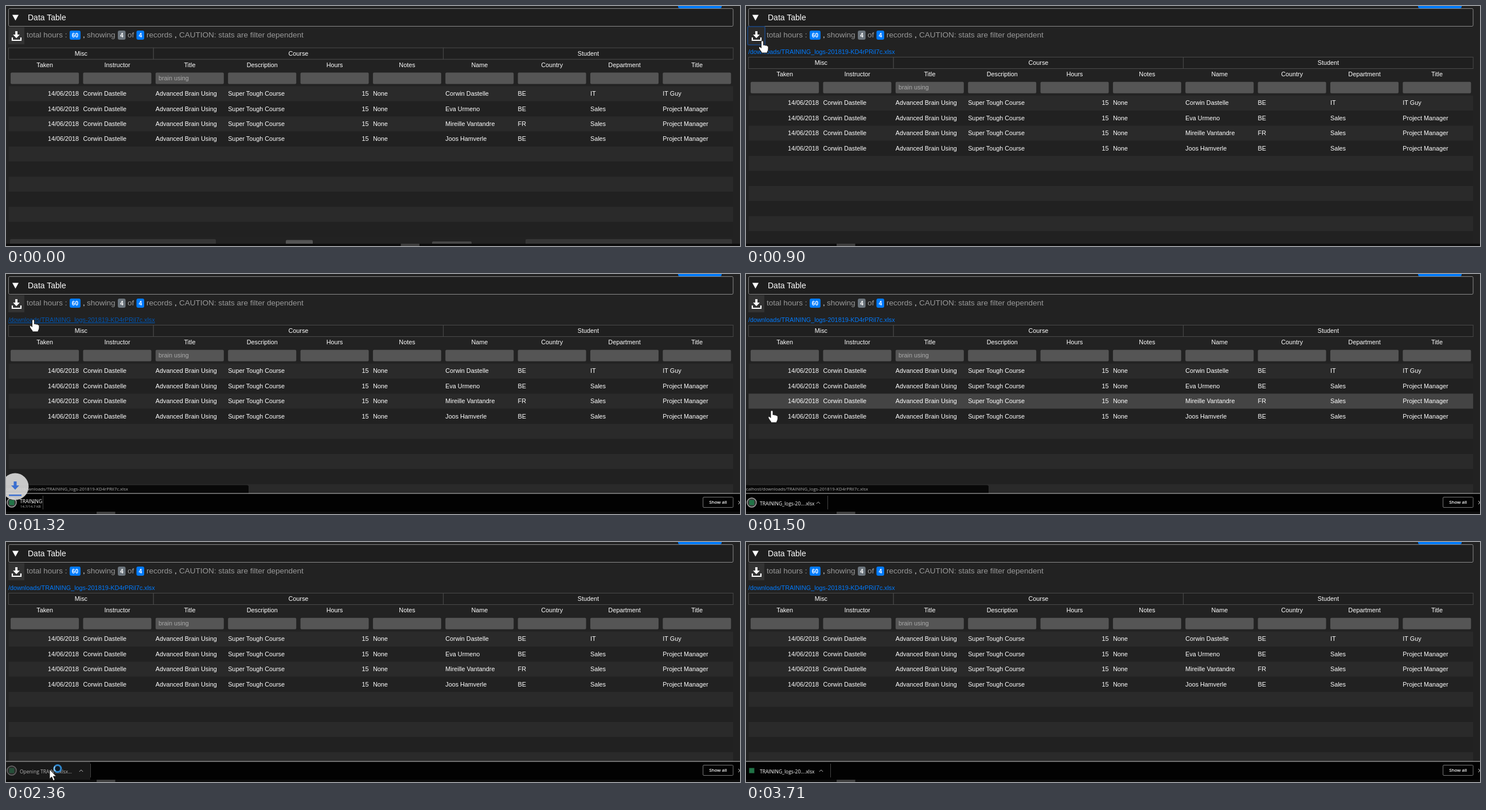
An HTML page for the animation above (3800 ms loop, 1280 by 420 pixels).

```html
<!DOCTYPE html>
<html lang="en">
<head>
<meta charset="utf-8">
<title>Data table export</title>
<style>
html, body { margin: 0; width: 100%; height: 100%; overflow: hidden; background: #222; }
svg { display: block; font-family: "Liberation Sans", Arial, sans-serif; font-size: 10.8px; }
.ui { font-family: "Open Sans", "Noto Sans", sans-serif; }
</style>
</head>
<body>
<svg id="stage" width="1280" height="420" viewBox="0 0 1280 420"></svg>
<script>
const LOOP = 3800;
const stage = document.getElementById('stage');

function el(tag, attrs, parent = stage) {
  const node = document.createElementNS('http://www.w3.org/2000/svg', tag);
  for (const key in attrs) node.setAttribute(key, attrs[key]);
  parent.appendChild(node);
  return node;
}
const group = (parent, attrs = {}) => el('g', attrs, parent);
const rect = (x, y, width, height, fill, parent, more) =>
  el('rect', { x, y, width, height, fill, ...more }, parent);
const path = (d, attrs, parent) => el('path', { d, ...attrs }, parent);
function text(str, x, y, fill, parent, more) {
  const node = el('text', { x, y, fill, ...more }, parent);
  node.textContent = str;
  return node;
}
const set = (node, key, value) => node.setAttribute(key, value);
const show = (node, on) => set(node, 'visibility', on ? 'visible' : 'hidden');
const move = (node, x, y) => set(node, 'transform', `translate(${x} ${y})`);
const mid = { 'text-anchor': 'middle' };

// Linear interpolation through rows of [time, value, value...]
function at(keys, t) {
  let i = 0;
  while (i < keys.length - 2 && t >= keys[i + 1][0]) i++;
  const [a, b] = [keys[i], keys[i + 1]];
  const k = Math.min(1, Math.max(0, (t - a[0]) / (b[0] - a[0])));
  return a.slice(1).map((v, n) => v + (b[n + 1] - v) * k);
}

// Page header
rect(0, 0, 1280, 420, '#222');
rect(1172, -6, 76, 10, '#007bff', stage, { rx: 3 });
rect(4.5, 4.5, 1263.5, 31, '#1e1e1e', stage, { rx: 2, stroke: '#8a8a8a' });
path('M11 15.5H22L16.5 25.5Z', { fill: '#fff' });
text('Data Table', 38, 25, '#fff', stage, { 'font-size': 14 });

const button = rect(4, 37, 28, 30, '#333');
const focusRing = rect(3, 36, 30, 32, 'none', stage, { rx: 2, stroke: '#1d3f6e', 'stroke-width': 2 });
path('M16.2 44h3.8v6h4l-5.9 6.3l-5.9-6.3h4z', { fill: '#fff' });
path('M11 55V60H26V55', { fill: 'none', stroke: '#fff', 'stroke-width': 2.2 });

const big = { 'font-size': 13.5 };
[['total hours :', 36], ['showing', 141], ['of', 212], ['records', 245],
 ['CAUTION: stats are filter dependent', 302]].forEach(([s, x]) => text(s, x, 55, '#999', stage, big));
[134, 294].forEach(x => text(',', x, 55, '#fff', stage, big));
[['60', 111, 19, '#007bff'], ['4', 195, 13.5, '#6c757d'], ['4', 227.5, 13.5, '#007bff']].forEach(([s, x, w, fill]) => {
  rect(x, 43, w, 16, fill, stage, { rx: 3 });
  text(s, x + w / 2, 54.7, '#fff', stage, { ...mid, 'font-size': 10.2, 'font-weight': 700 });
});

const FILE = 'TRAINING_logs-201819-KD4rPRil7c.xlsx';
const link = text('/downloads/' + FILE, 4, 84, '#007bff');

// Table
const table = group(stage);
const LEFT = 4.5, COL = 126.36, TOP = 140.3, ROW = 26.4;
const colX = i => LEFT + COL * i;

[['Misc', 0, 2], ['Course', 2, 6], ['Student', 6, 10]].forEach(([s, a, b]) => {
  rect(colX(a), 73.2, COL * (b - a), 20, '#1f1f1f', table, { stroke: '#4a4a4a' });
  text(s, (colX(a) + colX(b)) / 2, 87, '#fff', table, mid);
});
['Taken', 'Instructor', 'Title', 'Description', 'Hours', 'Notes', 'Name', 'Country', 'Department', 'Title'].forEach((s, i) => {
  text(s, colX(i) + COL / 2, 107, '#fff', table, mid);
  rect(colX(i) + 3.6, 116.5, 119, 20, '#555', table, { rx: 2 });
});
text('brain using', 266, 130, '#aaa', table);

const stripe = i => i % 2 ? '#212121' : '#2a2a2a';
const rows = Array.from({ length: 10 }, (_, i) =>
  rect(LEFT, TOP + ROW * i, 1263.5, ROW, stripe(i), table));
const TUTOR = 'Corwin Dastelle';
[[TUTOR, 'BE', 'IT', 'IT Guy'],
 ['Eva Urmeno', 'BE', 'Sales', 'Project Manager'],
 ['Mireille Vantandre', 'FR', 'Sales', 'Project Manager'],
 ['Joos Hamverle', 'BE', 'Sales', 'Project Manager']].forEach((person, r) => {
  ['14/06/2018', TUTOR, 'Advanced Brain Using', 'Super Tough Course', '15', 'None', ...person].forEach((s, i) => {
    const right = i === 0 || i === 4;
    text(s, colX(i) + (right ? 122.6 : 3.6), TOP + ROW * r + 16.9, '#fff', table,
      { 'text-anchor': right ? 'end' : 'start' });
  });
});
rect(LEFT, 404.4, 1263.5, 40, '#222', table);
[[7, 408, 359, '#363636'], [488, 409.5, 47, '#555'], [743, 412, 69, '#484848'], [906, 408, 360, '#363636']]
  .forEach(([x, y, w, fill]) => rect(x, y, w, 24, fill, table, { rx: 2 }));

// Link address shown at the window's lower left
const status = group(stage, { class: 'ui' });
rect(-5, 0, 428, 20, '#080808', status, { rx: 3 });
text('calhost/downloads/' + FILE, 0, 9.8, '#aaa', status, { 'font-size': 7.8 });

// Download shelf, drawn at its open place
const shelf = group(stage, { class: 'ui' });
rect(0, 384, 1280, 36, '#020202', shelf);
const itemBack = rect(0, 385, 147, 31, '#191919', shelf);
rect(0, 383.5, 1280, 1, '#c4c4c4', shelf);
const clip = el('clipPath', { id: 'item' }, shelf);
const clipBox = rect(0, 384, 147, 36, '#000', clip);
const item = group(shelf, { 'clip-path': 'url(#item)' });
const badge = el('circle', { cx: 10, cy: 400, r: 8, fill: '#383838', stroke: '#aaa', 'stroke-width': 1.4 }, item);
const fileIcon = rect(5.5, 395.5, 9, 9, '#217346', item);
const label = text('', 24, 405, '#fff', item, { 'font-size': 8.5 });
const size = text('14.7/14.7 KB', 25, 408.8, '#bbb', item, { 'font-size': 6.1 });
const chevron = path('M-3.2 402L0 398.8L3.2 402', { fill: 'none', stroke: '#bbb' }, shelf);
const divider = rect(0, 388, 1, 24, '#444', shelf);
rect(1215.5, 390.5, 52.5, 18, 'none', shelf, { rx: 1.5, stroke: '#777' });
text('Show all', 1241.7, 402.4, '#fff', shelf, { ...mid, 'font-size': 7.8, 'font-weight': 600 });
path('M1277 397l6 6M1277 403l6-6', { stroke: '#ccc' }, shelf);

// Falling download bubble
const bubble = group(stage);
el('circle', { r: 23.5, fill: '#dcdcdc', opacity: .9 }, bubble);
path('M-2.5-9h5v7h4.5l-7 7.5l-7-7.5h4.5zM-11 14h22v2.4h-22z', { fill: '#3b6fd0' }, bubble);

// Taskbar edge
rect(0, 416, 1280, 4, '#0c0c0c');
const task = rect(0, 416, 32.5, 4, '#404040');

// Pointers
const pointer = group(stage);
const outline = { fill: '#fff', stroke: '#111', 'stroke-width': .9, 'stroke-linejoin': 'round' };
const hand = path('M-2 1.5Q0-1 2 1.5V8Q4 7 5 8.6Q7 7.6 8 9.3Q10 8.8 10.4 11V15Q10 18 8.6 20V21.5H-1.5V20'
  + 'Q-4 17-6 13.5Q-7 11-4.5 11Q-3 11.5-2 13Z', outline, pointer);
const arrow = path('M0 0V16.5L3.7 13L6.4 19.5L9.2 18.3L6.5 12H11.6Z', outline, pointer);
const busy = group(pointer);
el('circle', { cx: 14, cy: -1.5, r: 6, fill: '#0d1a26', stroke: '#2f86cc', 'stroke-width': 3 }, busy);
const spark = el('circle', { cx: 14, cy: -1.5, r: 6, fill: 'none', stroke: '#8ccaf5', 'stroke-width': 2,
  'stroke-dasharray': '9 29' }, busy);

const pointerKeys = [
  [30, 1044, 311], [130, 820, 200], [250, 480, 70], [340, 200, 18], [430, 55, 24], [550, 28.5, 60.5],
  [1010, 28.5, 60.5], [1160, 47.5, 79.5], [1340, 47.5, 79.5], [1500, 45, 238.5], [1720, 45, 238.5],
  [1900, 49, 310], [2090, 66, 390], [2130, 66, 390], [2240, 76, 398], [2640, 76, 398], [2650, 82, 400],
  [2860, 82, 400], [2920, 220, 366], [3020, 520, 340], [3160, 880, 356], [3270, 1140, 392], [3340, 1212, 418]
];
const widthKeys = [[1220, 0], [1320, 64], [1340, 64], [1500, 142], [1620, 142], [1720, 147]];
const shelfKeys = [[1180, 32], [1290, 0]];
const bubbleKeys = [[1220, 340, 0], [1270, 357, 1], [1320, 372, 1], [1340, 372, 1], [1440, 392, 0]];
const hoverKeys = [[1390, 0], [1425, 1], [1460, 2], [1620, 3], [1790, -1]];

function draw(t) {
  const exported = t >= 780;
  const within = (a, b) => t >= a && t < b;

  move(table, 0, exported ? 16.3 : 0);
  show(link, exported);
  const overLink = within(1100, 1380);
  set(link, 'fill', overLink ? '#0056b3' : '#007bff');
  set(link, 'text-decoration', overLink ? 'underline' : 'none');
  set(button, 'fill', within(500, 1180) ? '#2b2b2b' : '#333');
  show(focusRing, within(650, 1180));
  set(task, 'x', t < 650 ? 688.5 : 158);

  let hover = -1;
  for (const [start, row] of hoverKeys) if (t >= start) hover = row;
  rows.forEach((row, i) => set(row, 'fill', i === hover ? '#444' : stripe(i)));

  const [drop] = at(shelfKeys, t);
  move(shelf, 0, drop);
  show(shelf, t >= 1180);
  move(status, 0, 369.5 + drop);
  show(status, within(1110, 1820));

  const [w] = at(widthKeys, t);
  const loading = t < 1420, opening = within(2260, 3580);
  set(clipBox, 'width', w);
  set(divider, 'x', w);
  move(chevron, w - 16, 0);
  label.textContent = opening ? 'Opening TRAIN....xlsx...' : loading ? 'TRAINING' : 'TRAINING_logs-20....xlsx';
  set(label, 'y', loading ? 401 : 405);
  set(label, 'fill', opening ? '#b4b4b4' : '#fff');
  set(size, 'opacity', loading ? 1 : 0);
  set(badge, 'opacity', at([[2260, 1], [2500, 0]], t)[0]);
  set(fileIcon, 'opacity', opening ? .5 : 1);
  set(itemBack, 'opacity', at([[2140, 0], [2240, 1], [2860, 1], [3000, 0]], t)[0]);

  const [fall, fade] = at(bubbleKeys, t);
  move(bubble, 16, fall);
  set(bubble, 'opacity', fade);

  const [x, y] = at(pointerKeys, t);
  const asHand = within(500, 1820);
  const seen = within(30, 3340);
  move(pointer, x, y);
  show(hand, seen && asHand);
  show(arrow, seen && !asHand);
  set(busy, 'opacity', within(2260, 3340) ? 1 : 0);
  set(spark, 'transform', `rotate(${t * .36} 14 -1.5)`);
}

const start = performance.now();
function tick() {
  draw((performance.now() - start) % LOOP);
  requestAnimationFrame(tick);
}
draw(0);
requestAnimationFrame(tick);
</script>
</body>
</html>
```
